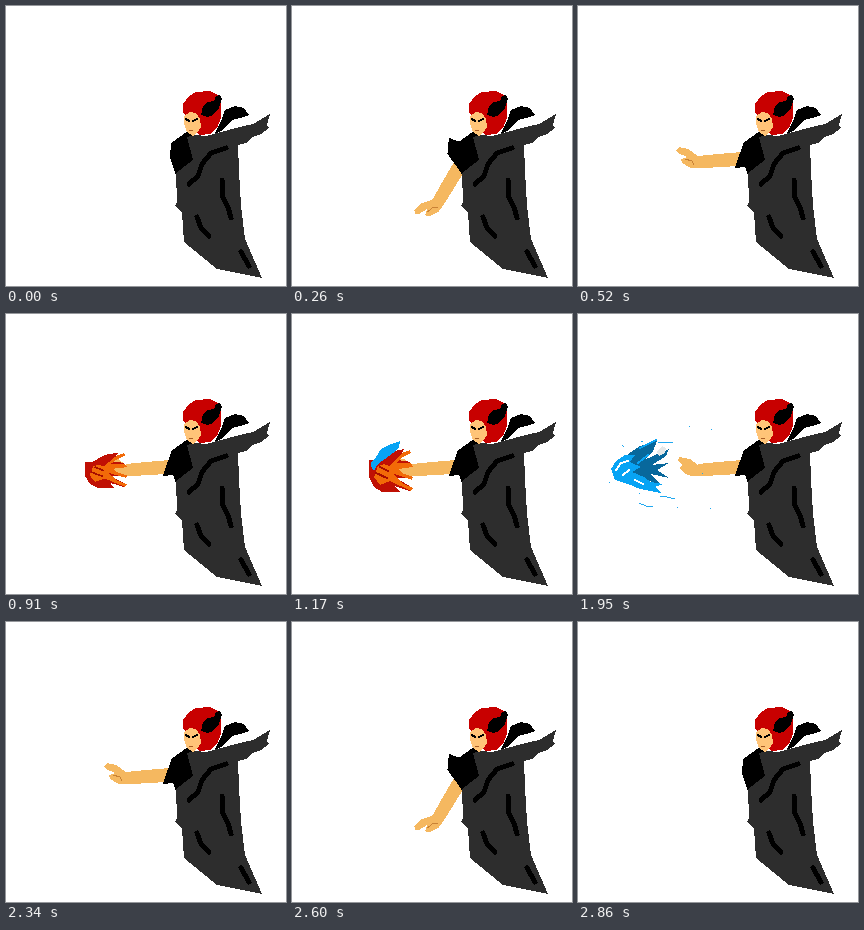
An HTML page for the animation above (2990 ms loop, 280 by 280 pixels).

```html
<!DOCTYPE html>
<html lang="en">
<head>
<meta charset="utf-8">
<title>Spell caster</title>
<style>
html, body { margin: 0; width: 100%; height: 100%; overflow: hidden; background: #fff; }
svg { display: block; width: 100%; height: 100%; }
.line { fill: none; stroke-linecap: round; stroke-linejoin: round; }
</style>
</head>
<body>
<svg viewBox="0 0 280 280" shape-rendering="crispEdges">
  <g id="arm">
    <path fill="#f5b860" d="M164 146L140 148L120 150L112 160L113 162L126 162L161 160Z"/>
    <g id="open">
      <path fill="#f5b860" d="M120 150L110 143L101 141L98 144L100 147L109 151L103 153L104 157L113 162L124 160Z"/>
      <path class="line" stroke="#c98235" d="M107 153L114 155L116 159"/>
    </g>
    <path id="push" fill="#f5b860" d="M120 151L112 145L101 143L100 147L104 151L101 154L106 159L113 162L124 160Z"/>
    <path d="M166 136L162 147L157 162L167 161L172 168L184 145L180 128Z"/>
  </g>
  <path id="peek" d="M165 162L164 172L167 184L172 184L172 162Z"/>

  <path d="M182 125L165 137L164 152L168 163L171 172L190 158L191 138L186 127Z"/>
  <path d="M208 129L215 115L219 104L229 100L238 102L243 109L234 112L226 114L217 124Z"/>
  <path fill="#2d2d2d" d="M181 131L189 129L200 130L215 126L234 121L247 118L264 108L261 119L263 122L255 128L247 131L240 137L232 139L233 165L235 200L239 233L256 272L236 268L211 263L178 236L176 207L169 200L171 196L170 167L187 154Z"/>
  <path class="line" stroke="#000" stroke-width="5" d="M220 142L205 147L196 158L192 170L183 178M216 174L217 192L222 201L225 212M191 211L195 222L203 230M235 246L243 260"/>
  <path fill="#c80000" d="M177 106L177 98L183 90L190 86L204 85L212 89L215 97L215 112L211 122L204 128L193 129L188 121Z"/>
  <path fill="#ffc478" d="M178 110L184 106L190 107L194 113L195 121L191 127L187 130L181 126L178 118Z"/>
  <path class="line" stroke="#000" stroke-width="2" d="M180 113L183 115M187 115L191 113"/>
  <path class="line" stroke="#a85c25" d="M183 124L187 124"/>
  <path d="M195 109L197 100L201 96L208 95L210 90L214 89L216 93L213 102L207 109L201 111Z"/>

  <g id="flame">
    <g id="embers">
      <path fill="#c01004" d="M77 146L84 147L98 138L112 135L106 146L119 148L104 157L121 164L104 164L121 174L117 177L103 172L108 178L90 178L82 173L77 163Z"/>
      <path fill="#f26a08" d="M82 163L86 152L92 150L97 152L110 139L118 136L119 139L111 143L104 149L119 149L121 153L106 155L112 160L121 163L120 166L102 160L110 169L121 174L119 177L98 167L88 171Z"/>
      <path class="line" stroke="#a80c00" stroke-width="2" d="M84 159L95 164M88 153L96 157"/>
    </g>
    <path id="blue" fill="#08a4f4"/>
    <path id="teal" fill="#087ba8" d="M82 155L90 146L103 140L117 144L118 148L108 153L98 157Z"/>
    <path id="redTail" class="line" stroke="#cc1806" stroke-width="3" d="M106 151L116 147M101 162L110 168L119 168M101 169L107 177M108 170L120 174"/>
    <path id="hot" fill="#f26a08" d="M82 159L95 153L116 154L118 157L105 160L112 163L120 164L119 167L104 164L113 173L110 177L97 167L88 164Z"/>
    <path id="smoke" fill="#e4e8e8" d="M109 139L114 135L118 136L117 140L110 143Z"/>
  </g>

  <g id="blast">
    <path fill="#08689c" d="M45 148L50 140L62 132L79 127L75 137L66 146L91 135L88 142L74 151L91 149L79 156L91 164L73 160L83 171L68 166L75 174L55 170Z"/>
    <path fill="#08a4f4" d="M33 155L38 147L47 141L57 141L52 148L63 153L54 158L66 163L73 168L85 170L77 173L83 179L62 175L50 170L37 166Z"/>
    <path class="line" stroke="#08a4f4" stroke-width="2" d="M62 134L78 126M60 149L70 141"/>
    <path class="line" stroke="#fff" stroke-width="2" d="M38 156L43 149L50 147M45 161L51 156M57 166L65 170"/>
    <path fill="#e4e8e8" d="M79 138L84 132L88 134L87 139L81 142Z"/>
  </g>
  <path id="specks" class="line" stroke="#20a8f0" d="M44 131L46 133M111 112L112 112M63 128L65 127M80 128L95 128M82 182L89 183L97 185M133 115L134 115M132 194L133 194M61 179L62 180M61 189L68 192L75 192M31 168L32 169M124 159L125 159M99 193L100 193"/>
</svg>
<script>
const STEP = 130, LOOP = 2990;
const el = id => document.getElementById(id);
const show = (id, on) => el(id).style.display = on ? "" : "none";
const place = (id, x, sx, sy, cx, cy) =>
  el(id).setAttribute("transform", `translate(${cx + x} ${cy}) scale(${sx} ${sy}) translate(${-cx} ${-cy})`);

// The blue edge starts as a crest and spreads down the whole fan.
const crest = [79,148, 84,143, 89,135, 97,131, 108,127, 107,134, 101,139, 93,145, 87,149, 84,153, 82,157, 80,155, 79,151];
const fan = [77,158, 79,146, 88,141, 93,133, 108,127, 107,134, 102,141, 92,150, 90,158, 96,165, 107,177, 91,178, 80,169];
const mix = k => "M" + crest.map((v, i) => v + (fan[i] - v) * k).join(" ") + "Z";

function draw(now) {
  const s = Math.floor(now % LOOP / STEP);
  const lift = Math.min(s, 22 - s);            // the arm rises and falls alike
  const pushing = s >= 6 && s <= 17;
  show("peek", lift === 1);
  show("arm", lift > 1);
  show("open", !pushing);
  show("push", pushing);
  el("arm").setAttribute("transform", `rotate(${lift === 2 ? -55 : lift === 3 ? -28 : 0} 172 152)`);

  const turn = Math.max(0, Math.min(1, (s - 9) / 3));
  const grow = Math.min(1, (s - 5) / 3);
  show("flame", s >= 5 && s <= 12);
  place("flame", 0, .88 + .12 * grow, .45 + .55 * grow, 121, 154);
  show("embers", s < 12);
  show("blue", s >= 9);
  show("teal", s >= 11);
  show("redTail", s >= 11);
  show("hot", s >= 11);
  show("smoke", s === 12);
  el("blue").setAttribute("d", mix(turn));

  const fly = s < 15 ? (15 - s) / 2 : 0;
  const gone = s === 17;
  show("blast", s >= 13 && s <= 17);
  show("specks", s >= 13 && s <= 17);
  place("blast", gone ? -18 : 30 * fly, 1 - .15 * fly, 1 - .1 * fly, 62, 153);
  const spread = gone ? 1.2 : 1 - .35 * fly;
  place("specks", 0, spread, spread, 80, 153);
}

const start = performance.now();
function tick() {
  draw(performance.now() - start);
  requestAnimationFrame(tick);
}
tick();
</script>
</body>
</html>
```
